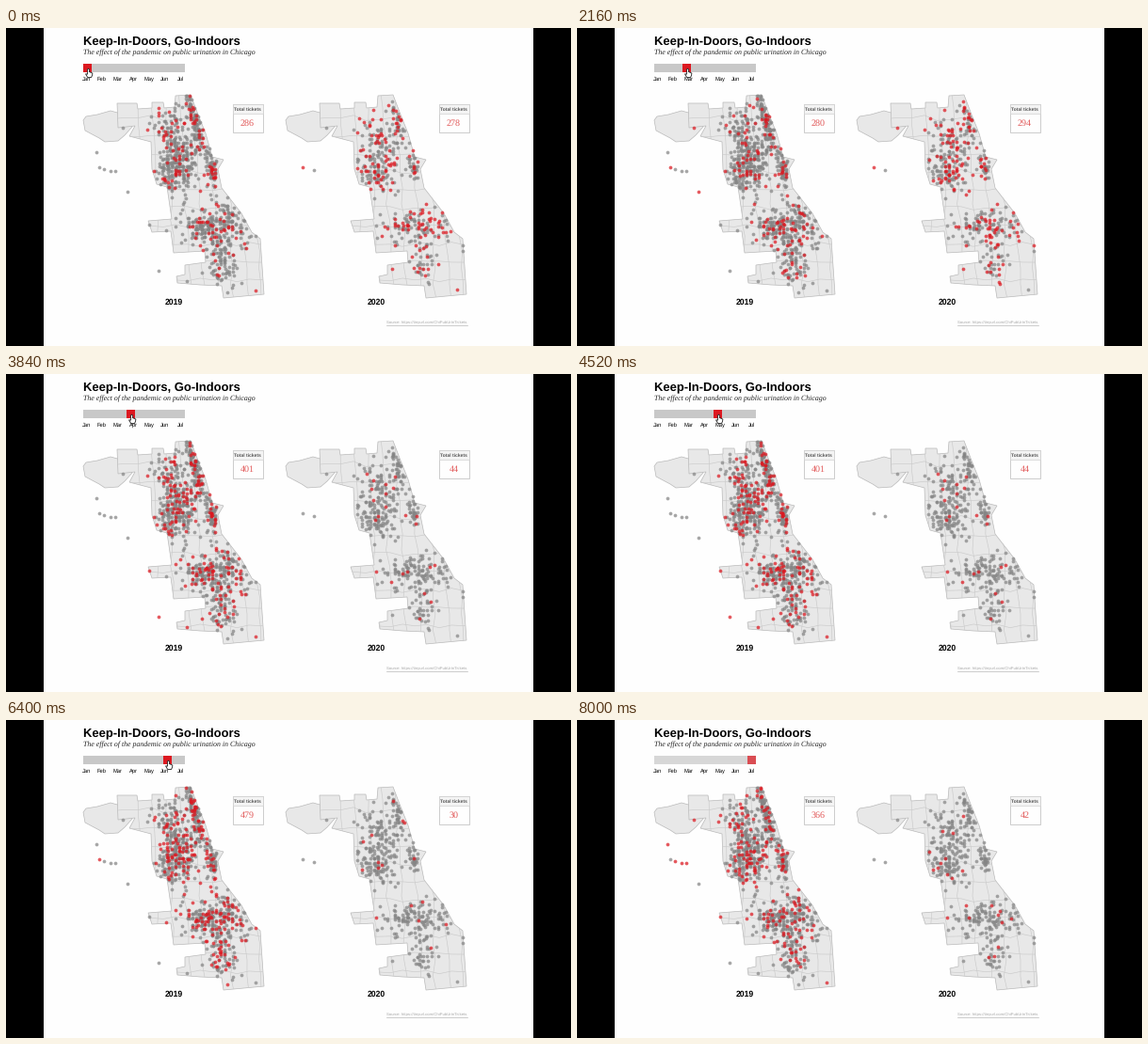
Recreate the animation shown at these times as a matplotlib script. Size 600x338 px, loop 8040 ms.

```python
import numpy as np
import matplotlib.pyplot as plt
from matplotlib.animation import FuncAnimation
from matplotlib.patches import Circle, Polygon, Rectangle
from matplotlib.path import Path

W, H, STEP, FRAMES = 600, 338, 40, 201
plt.rcParams["text.hinting"] = "none"
RED, GREY = "#dc1820", "#858585"
MONTHS = ["Jan", "Feb", "Mar", "Apr", "May", "Jun", "Jul"]
TICKETS = {2019: [286, 280, 372, 401, 466, 479, 366],
           2020: [278, 294, 160, 44, 74, 30, 42]}
SHIFT = {2019: 0, 2020: 215}
SWITCH = [1080, 2200, 3560, 4560, 5520, 6940]

CITY = np.array([
    (118, 80), (139, 80), (140, 86), (155, 85), (155, 79), (167, 79),
    (168, 85), (179, 84), (180, 72), (196, 71), (204, 92), (212, 112),
    (219, 137), (231, 140), (225, 150), (229, 170), (250, 197), (261, 217),
    (270, 224), (274, 283), (231, 287), (229, 274), (206, 273), (182, 271),
    (181, 264), (190, 262), (190, 252), (212, 249), (211, 237), (178, 239),
    (175, 216), (155, 217), (151, 205), (176, 203), (171, 169), (160, 166),
    (155, 150), (154, 121), (131, 115), (137, 104), (119, 106)], float)
AIRPORT = np.array([
    (82, 98), (85, 94), (97, 92), (111, 88), (122, 91), (131, 93),
    (134, 105), (126, 114), (119, 120), (105, 121), (99, 117), (84, 109)],
    float)
# weight, x, y, spread x, spread y, lean
HOTSPOTS = [
    (.13, 200, 95, 2.4, 15, .3), (.12, 178, 110, 13, 13, 0),
    (.25, 178, 152, 11, 11, 0), (.09, 218, 148, 3, 9, .1),
    (.09, 188, 130, 13, 9, 0), (.17, 211, 211, 14, 8, .1),
    (.09, 240, 207, 8, 12, .5), (.12, 226, 244, 8, 16, .15),
    (.04, 215, 195, 30, 45, .3)]
# lone places, with the months in which they are active
STRAYS = {2019: {(96, 132): "Jul", (99, 148): "Feb Jun", (104, 150): "Jul",
                 (111, 152): "May Jul", (116, 152): "Jul",
                 (129, 174): "Feb", (162, 258): "Apr",
                 (124, 106): "Feb Jul", (152, 209): "Apr Jul",
                 (265, 279): "Jan Apr May Jul"},
          2020: {(100, 148): "Jan Feb May", (112, 151): "",
                 (125, 106): "Feb", (178, 210): "Apr Jun Jul",
                 (264, 278): "Jan"}}


def make_places(rng, n):
    """Scatter places around the hotspots, some lined up along streets."""
    weights = np.array([h[0] for h in HOTSPOTS])
    area = Path(CITY)
    out = []
    while len(out) < n:
        spot = rng.choice(len(weights), p=weights / weights.sum())
        _, cx, cy, sx, sy, lean = HOTSPOTS[spot]
        dy = rng.normal(0, sy)
        x, y = cx + rng.normal(0, sx) + lean * dy, cy + dy
        if rng.random() < .4:
            x = round(x / 4.2) * 4.2 + (y - 180) * .02
        elif rng.random() < .5:
            y = round(y / 4.2) * 4.2 - (x - 200) * .02
        if area.contains_point((x, y)):
            out.append((x, y))
    return out


def make_year(year, n, seed):
    """Return per month the (idle, active) dots."""
    rng = np.random.default_rng(seed)
    strays = STRAYS[year]
    pts = np.array(make_places(rng, n) + list(strays)) + (SHIFT[year], 0)
    months = []
    for name, total in zip(MONTHS, TICKETS[year]):
        hit = np.zeros(len(pts), bool)
        hit[rng.choice(n, total // 2, replace=False)] = True
        hit[n:] = [name in when for when in strays.values()]
        months.append((pts[~hit].T, pts[hit].T))
    return months


def make_borders():
    """Lay out wobbly district lines over the city."""
    rng = np.random.default_rng(2)
    xs, ys = np.arange(115, 285, 13), np.arange(68, 292, 17)
    rows = [(xs, y + rng.normal(0, 1.3, len(xs)))
            for y in np.arange(96, 275, 19)]
    cols = [(x + .06 * (ys - 70) + rng.normal(0, 1.2, len(ys)), ys)
            for x in np.arange(139, 260, 15)]
    return rows + cols


fig = plt.figure(figsize=(W / 100, H / 100), dpi=100, facecolor="black")
ax = fig.add_axes([0, 0, 1, 1])
ax.set(xlim=(0, W), ylim=(H, 0))
ax.axis("off")


def text(x, y, s, px, font="Liberation Sans", color="black", ha="center", **kw):
    return ax.text(x, y, s, fontsize=px * .72, family=font, color=color,
                   ha=ha, va="baseline", **kw)


def box(x, y, w, h, fc, ec="none", lw=0, z=1):
    return ax.add_patch(Rectangle((x, y), w, h, fc=fc, ec=ec, lw=lw, zorder=z))


def dots(color, z):
    return ax.plot([], [], "o", ms=2.7, mew=0, color=color, alpha=.72,
                   zorder=z)[0]


box(40, 0, 520, H, "#fefefe", z=0)
text(81.5, 18.5, "Keep-In-Doors, Go-Indoors", 13, ha="left", weight="bold")
text(81.5, 28.5, "The effect of the pandemic on public urination in Chicago",
     7.9, "Liberation Serif", "#222222", "left", style="italic")
for i, name in enumerate(MONTHS):
    text(85.2 + 16.7 * i, 56, name, 5.8)
bar = box(82, 37.5, 108, 9, "#c8c8c8", z=2)
handle = box(82, 37.5, 9, 9, RED, z=3)

years = {2019: make_year(2019, 900, 4), 2020: make_year(2020, 430, 9)}
borders = make_borders()
layers, counts = {}, {}
for year, dx in SHIFT.items():
    for shape in (AIRPORT, CITY):
        land = ax.add_patch(Polygon(shape + (dx, 0), fc="#e8e8e8",
                                    ec="#b9b9b9", lw=.5))
    for xs, ys in borders:
        line, = ax.plot(xs + dx, ys, color="#cacaca", lw=.45, zorder=1.5)
        line.set_clip_path(land)
    layers[year] = dots(GREY, 2), dots(RED, 3)
    bx = 240.5 if year == 2019 else 459.5
    box(bx, 81, 32, 29.5, "#fefefe", "#c4c4c4", .6)
    box(bx, 81, 32, 9.5, "#f4f4f4", "#d0d0d0", .5)
    text(bx + 16, 88, "Total tickets", 5, color="#555555", weight="bold")
    counts[year] = text(bx + 16, 103.5, "", 10, "Liberation Serif", "#e25a5a")
    text(178 + dx, 294.3, str(year), 8.6, weight="bold")
text(404, 313.7, "Source: https://tinyurl.com/ChiPubUrinTickets", 4.25,
     color="#a8a8a8", ha="left")
ax.plot([404, 490], [315.8, 315.8], color="#b8b8b8", lw=.5)

HAND = np.array([(-.9, .3), (0, -.4), (.9, .3), (.9, 3), (4.4, 4.6),
                 (4, 7), (3, 9), (-.8, 9), (-3, 5.3), (-.9, 5.6)])
hand = ax.add_patch(Polygon(HAND, fc="white", ec="#222222", lw=.6, zorder=9))
ring = ax.add_patch(Circle((0, 0), 16.7, fill=False, ec="#333333", lw=.7,
                           zorder=8))

STOPS = [82, 95, 112, 128, 145, 167, 181]
DRAGS = [(840, 960), (1750, 1950), (3300, 3440), (4250, 4450),
         (5160, 5320), (6580, 6780)]
LEAVE, GONE = 7560, 7840


def thumb_x(t):
    return np.interp(t, np.ravel(DRAGS), np.repeat(STOPS, 2)[1:-1])


def update(i):
    t = i * STEP
    month = sum(t >= s for s in SWITCH)
    for year, (idle, active) in layers.items():
        a, b = years[year][month]
        idle.set_data(*a)
        active.set_data(*b)
        counts[year].set_text(str(TICKETS[year][month]))
    handle.set_x(thumb_x(t))
    hover = np.interp(t, [LEAVE + 40, LEAVE + 240], [1, .72])
    bar.set_alpha(hover)
    handle.set_alpha(hover)
    away = np.interp(t, [LEAVE, GONE], [0, 1])
    x = thumb_x(t + 80) + 5.5 + 28 * away
    y = 43.5 - 27 * away
    hand.set_xy(HAND + (x, y))
    hand.set_visible(t < GONE)
    ring.center = x - .5, y - .5
    ring.set_visible(any(a - 150 <= t < b + 50 for a, b in DRAGS))
    return []


anim = FuncAnimation(fig, update, frames=FRAMES, interval=STEP, repeat=True,
                     repeat_delay=0)
plt.show()
```
